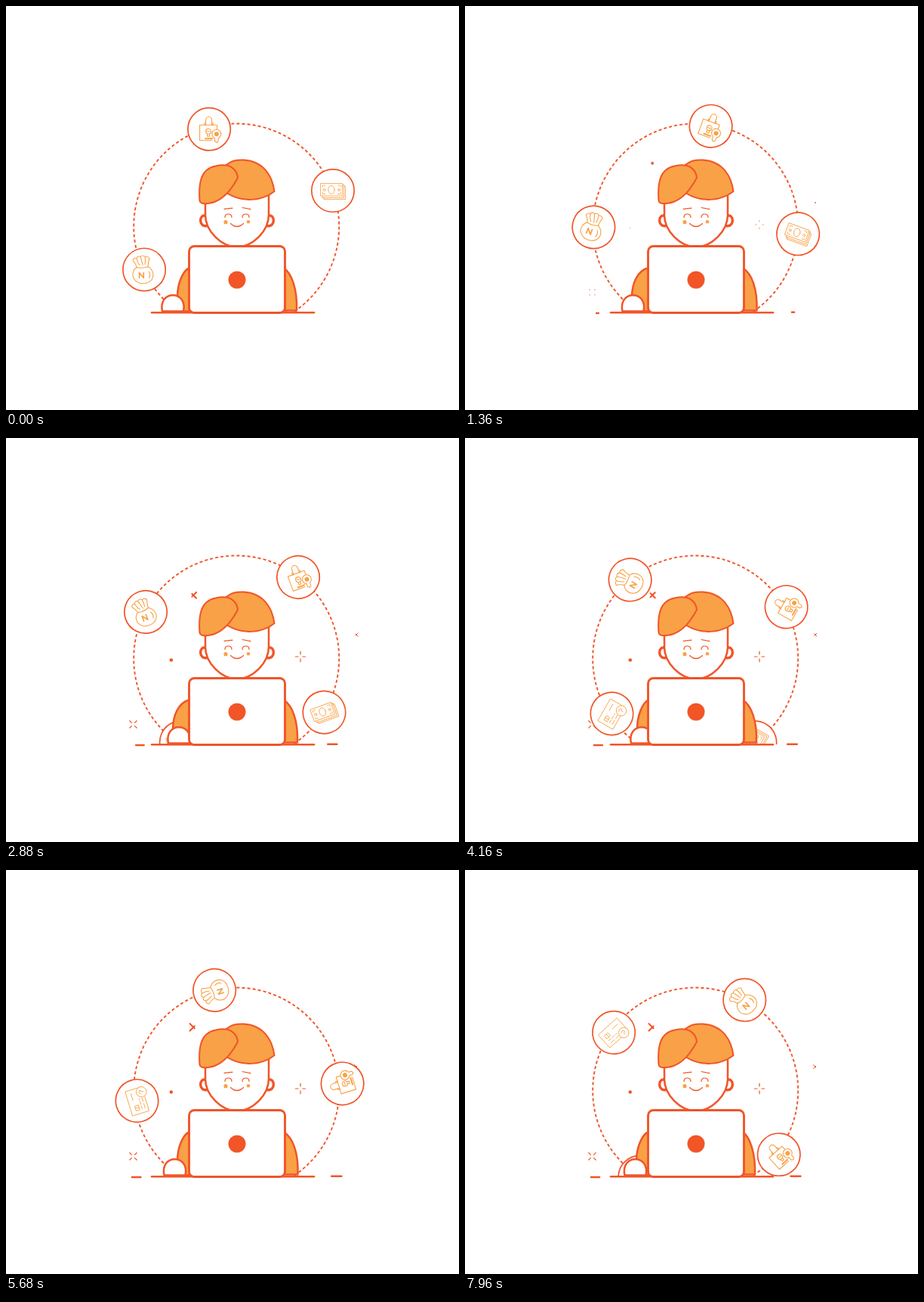
An HTML page that plays this animation: 600x534 px, repeating every 8 s.

```html
<!DOCTYPE html>
<html lang="en">
<head>
<meta charset="utf-8">
<title>Working online</title>
<style>
  html, body { margin: 0; width: 100%; height: 100%; overflow: hidden; background: #fff; }
  svg { display: block; width: 100%; height: 100%; }
  .line { fill: none; stroke: #f15528; stroke-linecap: round; stroke-linejoin: round; }
  .white { fill: #fff; }
  .orange { fill: #f9a146; }
  .icon { fill: none; stroke: #f9a146; stroke-width: 1.1; stroke-linejoin: round; stroke-linecap: round; }
  .fine { stroke-width: .85; }
  .icon .solid { fill: #f9a146; stroke: none; }
  .icon text { font: 900 11.5px Lato, sans-serif; text-anchor: middle; }
</style>
</head>
<body>
<svg viewBox="0 0 600 534">
  <defs>
    <clipPath id="aboveGround"><rect width="600" height="405"/></clipPath>

    <g id="lock" class="icon">
      <path d="M-6-5V-8H-4.500V-12A4 4.500 0 0 1 3.500-12V-8H5V-5M-4.500-8V-5M3.500-8V-5"/>
      <path d="M4 15H-12.500V-5.500H10.500V1"/>
      <circle cx="-1" cy="3" r="3.500"/>
      <path d="M-2.500 6.500V9.500H.5V6.500M-3 3H1"/>
      <path d="M-5 12.500H4" stroke-width="2"/>
      <path class="white" d="M7.500 12A6 6 0 1 1 12 12V16L10 18 7.500 16Z"/>
      <circle class="solid" cx="9.800" cy="6.500" r="3"/>
    </g>

    <g id="cash" class="icon fine">
      <path d="M14-6H16.500V11.500H-12V9M12-8H14.500V9.500H-14V7"/>
      <rect class="white" x="-16" y="-9.500" width="28.500" height="16.500"/>
      <ellipse cx="-2" cy="-1.200" rx="4.200" ry="5.500"/>
      <circle cx="-11.500" cy="-1" r="1.500"/>
      <circle cx="8" cy="-1" r="1.500"/>
      <path d="M-13.500-5V-7H-10M10-5V-7H6.500M-13.500 2.500V4.500H-10M10 2.500V4.500H6.500" stroke-dasharray="2 1.200"/>
    </g>

    <g id="bag" class="icon">
      <path d="M-10-3C-15 0-17 8-13 13C-8 20 5 20 10 13C14 7 11-1 5-4Q-3-1-10-3Z"/>
      <path d="M-10-3Q-11-8-15-12Q-14-16-10-15Q-9-19-5-17Q-2-20 1-17Q5-18 7-15Q5-9 5-4M-10-15Q-9-9-6-6M-5-17Q-3-11-2-6M1-17Q2-11 1-7"/>
      <path d="M6 2.500Q9 6.500 6.500 11"/>
      <text class="solid" x="-3.700" y="11.300">N</text>
    </g>

    <g id="card" class="icon fine">
      <rect x="-17" y="-11.500" width="33" height="23"/>
      <rect x="-12" y="-5" width="6" height="5"/>
      <path d="M-9-5V0M2-5H11M-12 3.500H-8M-6 3.500H-2M0 3.500H2M-12 7.500H-6M-3 7.500H2"/>
      <circle class="white" cx="9.700" cy="9" r="6.800"/>
      <path d="M7 7Q9.500 4.500 12 7Q12 9 9.500 9.500V11.500"/>
    </g>
  </defs>

  <g clip-path="url(#aboveGround)">
    <circle class="line" cx="305.200" cy="291.500" r="136" stroke-width="1.900" stroke-dasharray="4 3.120" style="stroke-linecap:butt"/>
    <g id="sparks" class="line"></g>
    <g id="badges"></g>
  </g>
  <g id="dashes" class="line" stroke-width="2.500"></g>

  <g class="line" stroke-width="2.500">
    <path id="leftArm" class="orange"/>
    <path id="rightArm" class="orange"/>
    <path d="M193 405.200H408"/>

    <path class="white" stroke-width="3.400" d="M265 277.500C255 274 255 293 266 290.500M347 277.500C357 274 357 293 346 290.500"/>
    <path class="white" d="M264 245V276C264 297 285 318.500 306 318.500S348 297 348 276V245Z"/>
    <path class="orange" stroke-width="2" d="M290 212C298 204 306 203 315 203.500C342 205 353 226 355.500 245C340 257 313 262 289 245Z"/>
    <path class="orange" stroke-width="2" d="M256.500 257C255 236 257 215 278 211.500C298 207 306 217 307 227C301 238 289 259 267 261Q257 262 256.500 257Z"/>
    <g stroke-width="1.200">
      <path d="M289 268.300L300 267.200M313 266.500L324 268.700"/>
      <path d="M290 279.500C290 273.500 299 273.500 299 279.500M313 279.500C313 273.500 322 273.500 322 279.500"/>
      <path d="M297.500 287.500Q306 295.500 314.500 287.500"/>
    </g>
    <g class="orange" stroke="none">
      <circle cx="291" cy="285.700" r="2.600"/>
      <circle cx="321" cy="285.300" r="2.300"/>
    </g>

    <path id="hand" class="white" d="M-14 403.500C-20 375 20 375 14 403.500Z"/>
    <rect class="white" x="242.500" y="317.500" width="127" height="88" rx="7" stroke-width="2.900"/>
    <circle cx="306" cy="362" r="11.500" fill="#f15528" stroke="none"/>
  </g>
</svg>

<script>
const LOOP = 8000;
const TIMES = [0, 1360, 2880, 4160, 5680, 7040, 7960];
const TILT = [0, 20, -20, -60, -107, -75, -42];
const HAND_X = [221, 222.5, 229, 234, 223.5, 223, 225.5];
const LEFT_ELBOW = [227, 221, 221, 228, 227, 226.5, 227];
const RIGHT_ELBOW = [385, 386.5, 386, 386, 386.5, 386.5, 384];
const REACH_LEFT = [0, .14, .35, .48, .9, .1, .9];
const REACH_RIGHT = [0, .14, .75, .67, .3, .1, .27];
const BURST = [0, .06, 1, 1, 1, .06, 1];
const DOT = [0, .25, 1, 1, .95, 0, .95];
const SPARK_START = 1240;

// Each badge tilts about a pivot on its orbit; dx, dy place it relative to that pivot.
const BADGES = [
  { icon: 'lock', x: 306.8, y: 290.4, r: 135.8, start: -15.7, dx: -1, dy: 3.1 },
  { icon: 'cash', x: 305.3, y: 291.5, r: 136.2, start: 69.6, dx: 0, dy: 0 },
  { icon: 'bag', x: 306, y: 291.2, r: 135.6, start: -115, dx: 0, dy: 0 },
  { icon: 'card', x: 305.8, y: 291.5, r: 133, start: -198.1, dx: 0, dy: 0 },
];
const DEGREES_PER_MS = 0.018;

const byId = id => document.getElementById(id);

function segment(t) {
  let i = 0;
  while (i < TIMES.length - 2 && t > TIMES[i + 1]) i++;
  const span = TIMES[i + 1] - TIMES[i];
  return { i, span, u: Math.min(1, (t - TIMES[i]) / span) };
}

function linear(values, t) {
  const { i, u } = segment(t);
  return values[i] + (values[i + 1] - values[i]) * u;
}

// Cubic Hermite curve through the keys, with finite-difference slopes.
function smooth(values, t) {
  const { i, span, u } = segment(t);
  const slope = k => {
    const a = Math.max(0, k - 1), b = Math.min(TIMES.length - 1, k + 1);
    return (values[b] - values[a]) / (TIMES[b] - TIMES[a]) * span;
  };
  const ease = u * u * (3 - 2 * u);
  return values[i] + (values[i + 1] - values[i]) * ease
    + slope(i) * u * (1 - u) ** 2 - slope(i + 1) * u * u * (1 - u);
}

byId('badges').innerHTML = BADGES.map(b => `<g>
  <g transform="translate(${b.dx} ${b.dy})">
    <circle class="line" style="fill:#fff" r="28.2" stroke-width="1.7"/>
    <use href="#${b.icon}"/>
  </g></g>`).join('');
const badgeNodes = [...byId('badges').children];

function drawBadges(t) {
  const tilt = smooth(TILT, t);
  BADGES.forEach((b, i) => {
    const angle = (b.start + t * DEGREES_PER_MS) * Math.PI / 180;
    const x = b.x + b.r * Math.sin(angle), y = b.y - b.r * Math.cos(angle);
    badgeNodes[i].setAttribute('transform', `translate(${x} ${y}) rotate(${tilt})`);
  });
}

function cross(x, y, size, width, left, right) {
  const l = left * size, r = right * size;
  return `<path stroke-width="${width}" d="M${x - l} ${y - l}L${x + r} ${y + r}M${x - l} ${y + l}L${x + r} ${y - r}"/>`;
}

function burst(x, y, turn, open) {
  const near = 4.8 - 1.9 * open, far = 4.8 + 1.9 * open;
  const arms = [0, 90, 180, 270].map(a =>
    `<path d="M${near} 0H${far}" transform="rotate(${a + turn})"/>`).join('');
  return `<g stroke-width="1.2" transform="translate(${x} ${y})">${arms}</g>`;
}

function drawSparks(t) {
  const visible = t >= SPARK_START;
  byId('sparks').style.display = byId('dashes').style.display = visible ? '' : 'none';
  if (!visible) return;
  const left = linear(REACH_LEFT, t), right = linear(REACH_RIGHT, t), open = linear(BURST, t);
  byId('sparks').innerHTML =
    cross(248.2, 207.8, 5.2, 2.1, left, right) +
    cross(464, 260, 2.8, 1, left, right) +
    burst(390, 289, 0, open) + burst(168.5, 378.5, 45, open) +
    `<circle cx="218.8" cy="293.5" r="${2.3 * linear(DOT, t)}" fill="#f15528" stroke="none"/>`;
  byId('dashes').innerHTML =
    `<path d="M${175.5 - 9.5 * left} 406H${175.5 + 9.5 * right}"/>` +
    `<path d="M${434.5 - 11 * right} 404.8H${434.5 + 11 * left}"/>`;
}

function drawArms(t) {
  const l = smooth(LEFT_ELBOW, t), r = smooth(RIGHT_ELBOW, t);
  byId('leftArm').setAttribute('d', `M243 346C${l + 7} 350 ${l} 367 ${l} 385V403.500H243Z`);
  byId('rightArm').setAttribute('d', `M369 347C${r - 7} 354 ${r + 1} 373 ${r} 402.500H369Z`);
  byId('hand').setAttribute('transform', `translate(${smooth(HAND_X, t)} 0)`);
}

function frame(now) {
  const t = now % LOOP;
  drawBadges(t);
  drawSparks(t);
  drawArms(t);
  requestAnimationFrame(frame);
}
frame(performance.now());
</script>
</body>
</html>
```
